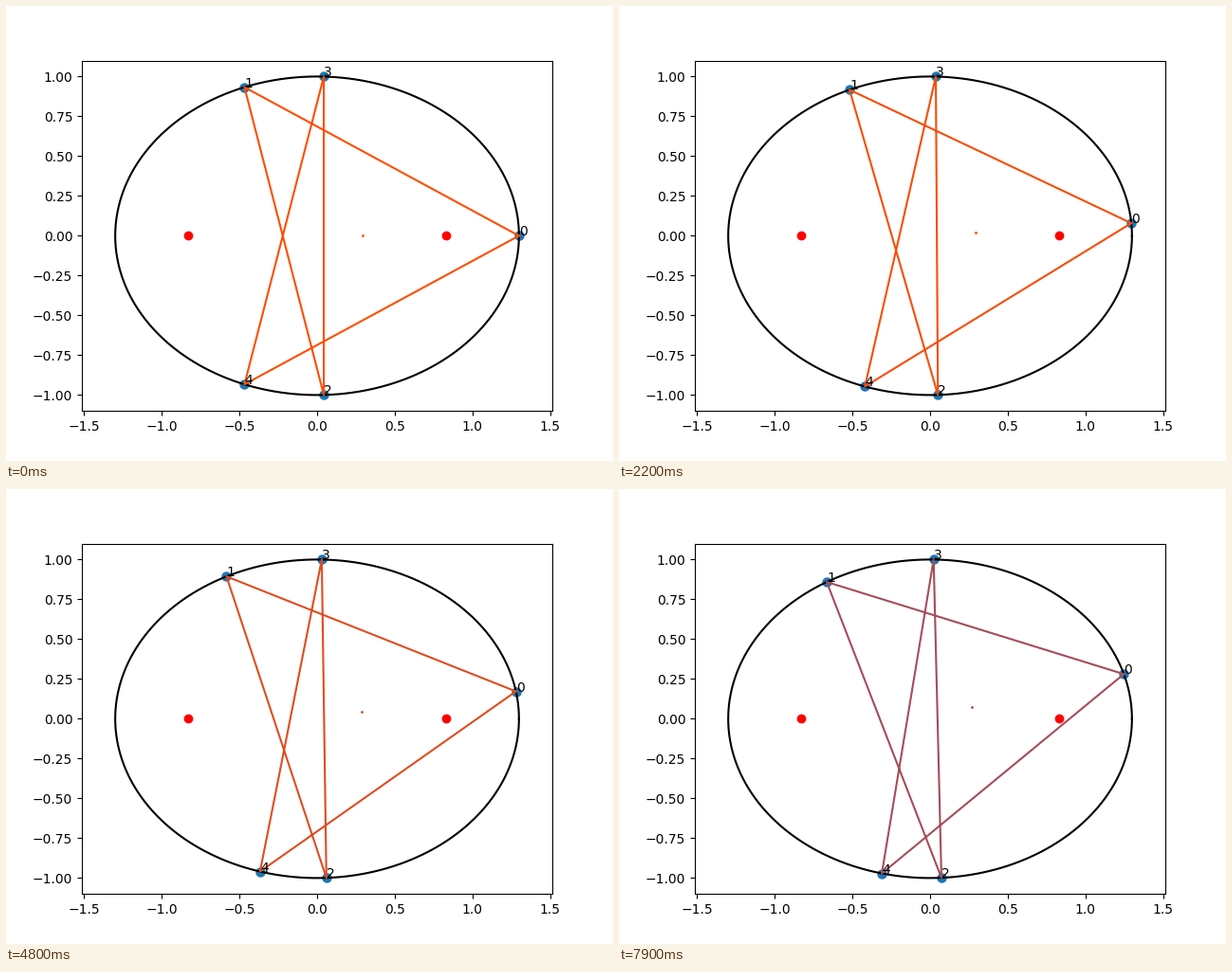
Animation, 640 px wide and 480 px high, one loop 8000 ms. Source, as a matplotlib script:

```python
import numpy as np
import matplotlib.pyplot as plt
from matplotlib.animation import FuncAnimation

A, B = 1.3, 1.0
FRAMES, INTERVAL = 80, 100
SPEED = 0.0036


def point(t):
    return np.stack([A * np.cos(t), B * np.sin(t)], axis=-1)


def tangent(t):
    return np.stack([-A * np.sin(t), B * np.cos(t)], axis=-1)


def equilateral(t0, guess):
    """Newton solve for an inscribed star with five equal sides."""
    u = guess.copy()  # four angles and the squared side
    for _ in range(12):
        t = np.concatenate([[t0], u[:4]])
        p, d = point(t), tangent(t)
        jac = np.zeros((5, 5))
        res = np.zeros(5)
        for i in range(5):
            j = (i + 1) % 5
            side = p[j] - p[i]
            res[i] = side @ side - u[4]
            jac[i, 4] = -1
            if i:
                jac[i, i - 1] = -2 * side @ d[i]
            if j:
                jac[i, j - 1] = 2 * side @ d[j]
        u -= np.linalg.solve(jac, res)
    return u


def all_stars():
    u = np.array([1.94, -1.54, 1.54, -1.94, 3.996])
    stars = []
    for n in range(FRAMES):
        u = equilateral(SPEED * n, u)
        stars.append(point(np.concatenate([[SPEED * n], u[:4]])))
    return stars


stars = all_stars()

fig, ax = plt.subplots(figsize=(6.4, 4.8), dpi=100)
ax.set_xlim(-1.5147, 1.5147)
ax.set_ylim(-1.1, 1.1)

ring = point(np.linspace(0, 2 * np.pi, 400))
ax.plot(ring[:, 0], ring[:, 1], color="black")
focus = np.sqrt(A**2 - B**2)
ax.plot([-focus, focus], [0, 0], "ro")

vertices, = ax.plot([], [], "o", color="tab:blue", ms=6, mew=1.5, zorder=1)
star, = ax.plot([], [], lw=1.5)
center, = ax.plot([], [], "o", ms=1)
labels = [ax.text(0, 0, str(i)) for i in range(5)]


def update(n):
    p = stars[n]
    t = SPEED * n
    blue = 0.0144 * n**2 / 255
    color = (1 - blue, 0.3, blue)
    closed = np.vstack([p, p[:1]])
    vertices.set_data(p[:, 0], p[:, 1])
    star.set_data(closed[:, 0], closed[:, 1])
    center.set_data([0.295 * np.cos(1.53 * t)], [0.17 * np.sin(1.53 * t)])
    star.set_color(color)
    center.set_color(color)
    for label, xy in zip(labels, p):
        label.set_position(xy)
    return [vertices, star, center, *labels]


anim = FuncAnimation(fig, update, frames=FRAMES, interval=INTERVAL,
                     repeat=True, repeat_delay=0)
plt.show()
```
